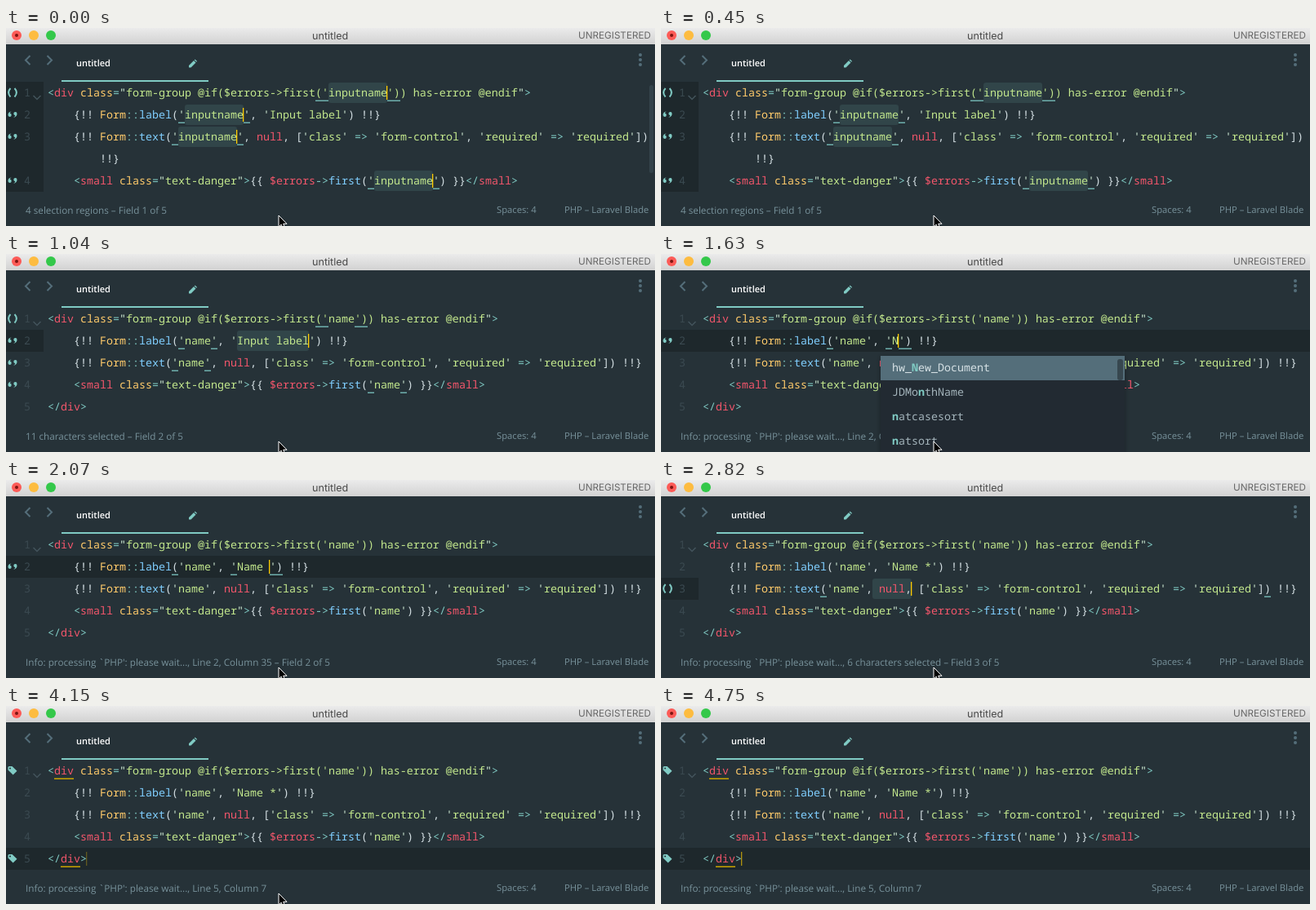
An HTML page for the animation above (4.85 s loop, 795x243 px).

```html
<!DOCTYPE html>
<html lang="en">
<head>
<meta charset="utf-8">
<title>Editor snippet</title>
<style>
  html, body { margin: 0; width: 100%; height: 100%; overflow: hidden; background: #263238; }
  svg { display: block; width: 795px; height: 243px; }
  text { white-space: pre; text-rendering: geometricPrecision; }
  .code { font: 13.3333px "Noto Sans Mono", monospace; fill: #cfdbdf; }
  .ui { font: 11.73px "Open Sans", sans-serif; fill: #78929b; }
  .bar { font: 12.6px Inter, sans-serif; fill: #494949; }
  .p { fill: #80cbc4; } .r { fill: #f2566b; } .y { fill: #ffcb6b; } .g { fill: #c3e88d; }
  .q { fill: #d9f5dd; } .b { fill: #80cfff; } .w { fill: #d5e0e4; }
  .num { fill: #3b4a51; }
  .sel { fill: #314549; } .active { fill: #1e282c; }
  .match { fill: #80cbc4; font-weight: 700; }
  .line { fill: none; stroke-width: 2; }
</style>
</head>
<body>
<svg viewBox="0 0 795 243">
  <defs>
    <linearGradient id="metal" x2="0" y2="1">
      <stop stop-color="#ebebeb"/><stop offset="1" stop-color="#d2d2d2"/>
    </linearGradient>
    <filter id="shadow" x="-10%" y="-10%" width="120%" height="120%">
      <feDropShadow dx="0" dy="2" stdDeviation="3" flood-opacity=".35"/>
    </filter>
    <g id="round" class="line" stroke="#80cbc4">
      <path d="M5.5 8Q.7 13 5.5 18.5M10.500 8Q15.300 13 10.500 18.500"/>
    </g>
    <g id="quote" fill="#80cbc4">
      <path d="M6.600 9.500Q2.500 10 2.500 13.700A2.100 2.100 0 1 0 4.700 11.700Q5 10.600 6.600 9.500Z"/>
      <path d="M9 17Q13.500 16 13.500 12.300A2.100 2.100 0 1 0 11.300 14.300Q11 16 9 17Z"/>
    </g>
    <path id="tag" fill="#80cbc4" fill-rule="evenodd"
      d="M3.500 8H7.500L13.500 13.700 8.600 18.500 2.500 12.500V9ZM4 10.500a1 1 0 1 0 2 0a1 1 0 1 0-2 0"/>
  </defs>

  <rect width="795" height="243" fill="#263238"/>
  <rect width="795" height="20" fill="url(#metal)"/>
  <circle cx="13" cy="9" r="6" fill="#fc5b57"/>
  <circle cx="13" cy="9" r="2" fill="#7d1511"/>
  <circle cx="34" cy="9" r="6" fill="#fdbc40"/>
  <circle cx="55" cy="9" r="6" fill="#34c84a"/>
  <text class="bar" x="375" y="14">untitled</text>
  <text class="bar" x="701" y="13" style="font-size:11.7px;fill:#666">UNREGISTERED</text>

  <path class="line" stroke="#546e7a" d="M29.500 34 24 39.500 29.500 45M50.500 34 56 39.500 50.500 45"/>
  <text class="ui" x="86" y="47" style="font-size:11px;font-weight:600;fill:#fff">untitled</text>
  <path fill="#80cbc4" d="M224 48.500V46L230 40 232.500 42.500 226.500 48.500ZM230.700 39.300 231.700 38.500 234 40.800 233.200 41.800Z"/>
  <rect x="68" y="64" width="180" height="2" fill="#80cbc4"/>
  <g fill="#546e7a">
    <circle cx="777" cy="33" r="2"/><circle cx="777" cy="39" r="2"/><circle cx="777" cy="45" r="2"/>
  </g>

  <g id="editor"></g>
  <text class="ui" x="601" y="227" style="font-size:11.25px">Spaces: 4</text>
  <text class="ui" x="684" y="227" style="font-size:11.25px">PHP – Laravel Blade</text>
  <g id="overlay"></g>
</svg>

<script>
const LEFT = 51, TOP = 66, CHAR = 8, ROW = 27, LOOP = 4850;
const editor = document.getElementById('editor');
const overlay = document.getElementById('overlay');

const xOf = col => LEFT + col * CHAR;
const yOf = row => TOP + row * ROW;
const esc = s => s.replace(/&/g, '&amp;').replace(/</g, '&lt;');
const rect = (x, y, w, h, attrs) => `<rect x="${x}" y="${y}" width="${w}" height="${h}" ${attrs}/>`;

// Each token is [class, text]; every one starts on the character grid.
function textRun(x, y, tokens) {
  let col = 0, out = '';
  for (const [cls, s] of tokens) {
    out += `<tspan class="${cls}" x="${x + col * CHAR}">${esc(s)}</tspan>`;
    col += s.length;
  }
  return `<text class="code" y="${y}">${out}</text>`;
}
const codeRow = (row, col, tokens) => textRun(xOf(col), yOf(row) + 18, tokens);

const str = s => [['q', "'"], ['g', s], ['q', "'"]];
const arrow = ['p', ' => '];
const formCall = fn => [['w', '{!! '], ['y', 'Form'], ['p', '::'], ['b', fn], ['w', '(']];

function codeLines(name, label) {
  const wrapped = name.length > 4;
  const last = wrapped ? 4 : 3;
  return [
    codeRow(0, 0, [['p', '<'], ['r', 'div'], ['y', ' class'], ['p', '='], ['q', '"'],
      ['g', `form-group @if($errors->first('${name}')) has-error @endif`], ['q', '"'], ['p', '>']]),
    codeRow(1, 4, [...formCall('label'), ...str(name), ['w', ', '], ...str(label), ['w', ') !!}']]),
    codeRow(2, 4, [...formCall('text'), ...str(name), ['w', ', '], ['r', 'null'], ['w', ', ['],
      ...str('class'), arrow, ...str('form-control'), ['w', ', '],
      ...str('required'), arrow, ...str('required'), ['w', wrapped ? '])' : ']) !!}']]),
    wrapped ? codeRow(3, 8, [['w', '!!}']]) : codeRow(4, 0, [['p', '</'], ['r', 'div'], ['p', '>']]),
    codeRow(last, 4, [['p', '<'], ['r', 'small'], ['y', ' class'], ['p', '='], ['q', '"'],
      ['g', 'text-danger'], ['q', '"'], ['p', '>'], ['w', '{{ '], ['r', '$errors'], ['p', '->'],
      ['b', 'first'], ['w', '('], ...str(name), ['w', ') }}'], ['p', '</'], ['r', 'small'], ['p', '>']]),
    ...(wrapped ? [0, 1, 2, 4] : [0, 1, 2, 3, 4]).map((row, i) =>
      textRun(22, yOf(row) + 18, [['num', String(i + 1)]])),
  ].join('');
}

function popupMarkup({ query, items }) {
  const rows = items.map((item, i) => {
    const at = item.toLowerCase().indexOf(query);
    const end = at + query.length;
    const base = i ? 'pale' : 'w';
    return textRun(283, 144 + i * 30, [[base, item.slice(0, at)], ['match', item.slice(at, end)], [base, item.slice(end)]]);
  });
  return rect(269, 125, 299, 130, 'fill="#202b30" filter="url(#shadow)"') +
    rect(269, 125, 299, 30, 'fill="#546e7a"') +
    rect(559, 129, 7, 26, 'rx="3" fill="#37474f"') +
    `<g fill="#a3b3ba">${rows.join('').replace(/class="pale"/g, 'fill="#a3b3ba"')}</g>`;
}

const pointerMarkup = ([x, y]) =>
  `<path transform="translate(${x} ${y})" d="M0 0V14L3.200 11.200 5.600 16.500 8 15.500 5.700 10.300H10Z" fill="#000" stroke="#fff"/>`;

function draw(s) {
  const out = [];
  for (const row of s.active) {
    out.push(rect(0, yOf(row), s.sels.length ? 46 : 795, ROW, 'class="active"'));
  }
  for (const [row, col, len] of s.sels) {
    out.push(rect(xOf(col), yOf(row) + 1, len * CHAR, 25, 'rx="3" class="sel"'));
  }
  out.push(codeLines(s.name, s.label));
  out.push('<path d="M33.500 83 38 87.500 42.500 83" class="line" stroke="#43545c" style="stroke-width:1.500"/>');
  for (const [row, col, len] of s.marks) {
    out.push(rect(xOf(col), yOf(row) + 22.5, len * CHAR, 1.5, `fill="${s.markColor}"`));
  }
  for (const [row, icon] of s.icons) out.push(`<use href="#${icon}" y="${yOf(row)}"/>`);
  for (const [row, col] of s.carets) {
    out.push(rect(xOf(col) - 1, yOf(row) + 5, 1.3, 17, `fill="#ffcc00" opacity="${s.blink}"`));
  }
  if (s.scroll) out.push(rect(788, 70, 5, 108, `rx="2.5" fill="#37474f" opacity="${s.scroll}"`));
  out.push(`<text class="ui" x="24" y="228">${esc(s.status)}</text>`);
  editor.innerHTML = out.join('');
  overlay.innerHTML = (s.popup ? popupMarkup(s.popup) : '') + (s.pointer ? pointerMarkup(s.pointer) : '');
}

const scene = options => ({
  name: 'name', label: 'Input label', active: [], sels: [], marks: [], icons: [], carets: [],
  markColor: '#6fb0ad', blink: 1, pointer: [334, 230], ...options,
});
const INFO = "Info: processing `PHP': please wait..., ";

function nameField(name, options) {
  const n = name.length, wrapped = n > 4;
  const rows = [0, 1, 2, wrapped ? 4 : 3], cols = [43, 21, 20, 50];
  const each = fn => rows.map((row, i) => fn(row, cols[i], i));
  return scene({
    name,
    active: wrapped ? [0, 1, 2, 3, 4] : rows,
    sels: wrapped ? each((row, col) => [row, col, n]) : [],
    carets: each((row, col) => [row, col + n]),
    marks: each((row, col, i) => i ? [[row, col - 1, 1], [row, col + n, 1]]
      : [[row, col - 2, 2], [row, col + n, 2]]).flat(),
    icons: each((row, col, i) => [row, i ? 'quote' : 'round']),
    status: '4 selection regions – Field 1 of 5',
    ...options,
  });
}

function labelField(label, options) {
  const n = label.length;
  return scene({
    label, active: [1], carets: [[1, 29 + n]], icons: [[1, 'quote']],
    marks: [[1, 19, 1], [1, 28, 1], [1, 29 + n, 2]],
    status: `${INFO}Line 2, Column ${30 + n} – Field 2 of 5`,
    ...options,
  });
}

const labelSelected = { sels: [[1, 29, 11]], status: '11 characters selected – Field 2 of 5' };
const suggest = (query, ...items) => ({ popup: { query, items } });

function optionField(col, len, field, options) {
  return scene({
    label: 'Name *', active: [2], sels: [[2, col, len]], carets: [[2, col + len]],
    status: `${INFO}${len} characters selected – Field ${field} of 5`,
    ...options,
  });
}

const finished = (blink, pointer = [334, 230]) => scene({
  label: 'Name *', active: [4], carets: [[4, 6]], blink, pointer,
  marks: [[0, 1, 3], [4, 2, 3]], markColor: '#c9a400',
  icons: [[0, 'tag'], [4, 'tag']], status: INFO + 'Line 5, Column 7',
});

const timeline = [
  [0, nameField('inputname', { scroll: 0.8 })],
  [150, nameField('inputname', { blink: 0.65, scroll: 0.8 })],
  [300, nameField('inputname', { blink: 0.2 })],
  [450, nameField('inputname', { blink: 0 })],
  [600, nameField('na')],
  [750, nameField('nam')],
  [890, nameField('name')],
  [1040, nameField('name', { active: [1], carets: [[1, 40]], ...labelSelected })],
  [1480, labelField('Input label', labelSelected)],
  [1630, labelField('N', suggest('n', 'hw_New_Document', 'JDMonthName', 'natcasesort', 'natsort'))],
  [1780, labelField('Na', suggest('na', 'JDMonthName', 'natcasesort', 'natsort', 'ibase_name_result'))],
  [1920, labelField('Nam', suggest('nam', 'JDMonthName', 'ibase_name_result', 'session_name', 'basename'))],
  [2070, labelField('Name ')],
  [2520, labelField('Name *')],
  [2820, optionField(26, 6, 3, { marks: [[2, 18, 1], [2, 86, 1]], icons: [[2, 'round']] })],
  [3120, optionField(59, 26, 4)],
  [3270, finished(1)],
  [3720, finished(0.65)],
  [3860, finished(0.2)],
  [4010, finished(0)],
  [4150, finished(0.3)],
  [4300, finished(0.75, null)],
  [4450, finished(1, [760, 229])],
  [4600, finished(1, [785, 235])],
  [4750, finished(0.65, null)],
];

const start = performance.now();
let shown;
function tick() {
  const t = (performance.now() - start) % LOOP;
  const current = timeline.findLast(([at]) => at <= t)[1];
  if (current !== shown) draw(shown = current);
  requestAnimationFrame(tick);
}
tick();
</script>
</body>
</html>
```
